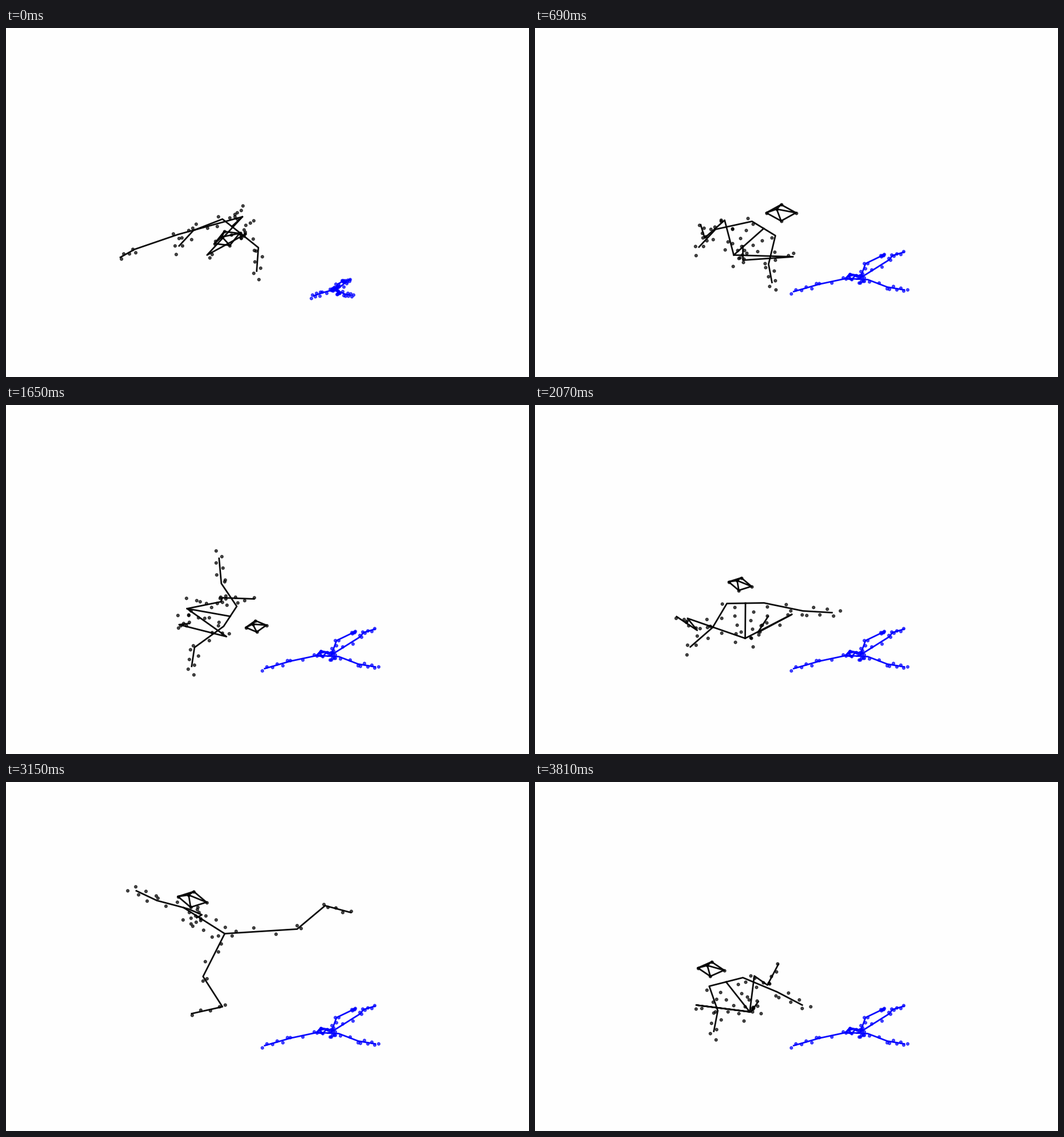
A matplotlib script that plays this animation: 917x611 px, repeating every 3.84 s.

```python
import numpy as np
import matplotlib.pyplot as plt
from matplotlib.animation import FuncAnimation

W, H, FRAMES, STEP = 917, 611, 128, 30

# Points are complex numbers, x + y*1j, in pixels.
# Joints: 0-6 hand to hand across the neck, 7 waist, 8 pelvis,
# 9-11 and 12-14 legs, 15-19 head.
CHAINS = [[0, 1, 2, 3, 4, 5, 6], [3, 7, 8],
          [11, 10, 9, 8, 12, 13, 14],
          [15, 16, 17, 18, 15, 19, 17], [16, 19, 18]]


def pose(arm_a, arm_b, pelvis, leg_a, leg_b, head, tilt):
    """Arms run hand to shoulder, legs knee to toe; the rest follows."""
    neck = (arm_a[2] + arm_b[2]) / 2
    up = -.55j * tilt
    crown = [head - tilt, head + up, head + tilt, head - up,
             head - .3 * tilt + .45 * up]
    return np.array([*arm_a, neck, *arm_b[::-1], (neck + pelvis) / 2, pelvis,
                     *leg_a, *leg_b, *crown])


crouch = pose((303+381j, 328+354j, 379+334j), (439+425j, 442+384j, 412+360j),
              414+330j, (301+361j, 225+387j, 200+401j),
              (352+397j, 420+360j, 410+366j), 387+368j, 22-9j)
kneel = pose((287+383j, 316+352j, 380+338j), (415+445j, 409+413j, 421+363j),
             348+397j, (332+336j, 297+367j, 290+344j),
             (452+400j, 364+406j, 364+381j), 431+323j, 26)
reach = pose((325+457j, 330+424j, 381+387j), (373+268j, 377+312j, 404+352j),
             317+356j, (386+405j, 303+384j, 321+382j),
             (376+344j, 379+337j, 434+339j), 438+387j, 18-2j)
sit = pose((272+423j, 311+389j, 336+347j), (520+363j, 469+360j, 401+346j),
           368+408j, (267+373j, 284+394j, 248+370j),
           (450+366j, 390+398j, 408+370j), 359+313j, 20+4j)
run = pose((297+284j, 318+268j, 323+303j), (435+384j, 404+352j, 363+335j),
           388+314j, (310+367j, 350+419j, 293+422j),
           (399+380j, 466+366j, 468+368j), 331+306j, 24+4j)
leap = pose((228+190j, 264+207j, 302+217j), (334+237j, 343+232j, 320+222j),
            383+265j, (345+340j, 379+393j, 325+405j),
            (510+257j, 559+216j, 604+228j), 326+205j, 25+5j)
rest = pose((313+436j, 320+400j, 305+357j), (468+390j, 424+367j, 364+342j),
            376+402j, (282+390j, 378+402j, 391+384j),
            (384+339j, 407+355j, 426+319j), 308+327j, 23+2j)
spread = pose((453+461j, 498+448j, 545+438j), (647+458j, 617+453j, 583+440j),
              570+437j, (621+405j, 626+398j, 646+392j),
              (579+412j, 606+399j, 612+396j), 553+435j, 9-3j)

KEYS = np.stack([crouch, kneel, reach, sit, run, leap, rest])
TIMES = np.array([0, 690, 1650, 2070, 2730, 3150, 3810.])
SLOPES = np.gradient(KEYS, TIMES, axis=0)


def smooth(u):
    return u * u * (3 - 2 * u)


def dancer(t):
    """Cubic Hermite path through the key poses, with two wide lunges."""
    k = min(np.searchsorted(TIMES, t, side="right") - 1, len(TIMES) - 2)
    span = TIMES[k + 1] - TIMES[k]
    u = (t - TIMES[k]) / span
    p = (KEYS[k] + (KEYS[k + 1] - KEYS[k]) * smooth(u)
         + span * u * (1 - u) * ((1 - u) * SLOPES[k] - u * SLOPES[k + 1]))
    lunge = sum(size * np.exp(-((t - at) / 80) ** 2)
                for at, size in ((1860, 1.2), (3390, .25)))
    p[:15] += lunge * (p[:15] - p[8]).real
    return p


def partner(t):
    """Uncurls with a small swing, then lies still."""
    s = smooth(min(t / 600, 1))
    curled = 539 + .33 * (spread.real - 453) + 1j * (468 + .41 * (spread.imag - 460))
    return curled + (spread - curled) * s + np.sin(np.pi * s) * (34 + 22j)


# Marker rows along bones: (from, to, count, px aside, px past the end)
ROWS = [(3, 8, 10, 16, 14)]
for shoulder, elbow, hand in ((2, 1, 0), (4, 5, 6)):
    ROWS += [(shoulder, elbow, 3, 6, 0), (elbow, hand, 6, 7, 14)]
for knee, ankle, toe in ((9, 10, 11), (12, 13, 14)):
    ROWS += [(8, knee, 4, 8, 0), (knee, ankle, 2, 5, 0), (ankle, toe, 4, 3, 0)]
JITTER = np.random.default_rng(4).uniform(.5, 1.2, (len(ROWS), 10))


def markers(p, scale=1):
    """Dots on alternate sides of each bone, and on the head's corners."""
    dots = [p[15:]]
    for (a, b, n, aside, past), jitter in zip(ROWS, JITTER):
        bone = p[b] - p[a]
        unit = bone / max(abs(bone), 1)
        side = aside * jitter[:n] * (-1.) ** np.arange(n)
        dots.append(p[a] + np.linspace(.1, 1, n) * (bone + scale * past * unit)
                    + 1j * scale * side * unit)
    return np.concatenate(dots)


fig = plt.figure(figsize=(W / 100, H / 100), dpi=100, facecolor="#fefefe")
ax = fig.add_axes([0, 0, 1, 1])
ax.set(xlim=(-.5, W - .5), ylim=(H - .5, -.5))
ax.axis("off")


class Figure:
    def __init__(self, color):
        self.dots, = ax.plot([], [], "o", color=color, ms=3.4, mew=1, alpha=.7)
        self.bones = [ax.plot([], [], color=color, lw=2, alpha=.95,
                              solid_joinstyle="round")[0] for _ in CHAINS]

    def move(self, joints, dots):
        self.dots.set_data(dots.real, dots.imag)
        for line, chain in zip(self.bones, CHAINS):
            line.set_data(joints[chain].real, joints[chain].imag)
        return [self.dots, *self.bones]


black, blue = Figure("black"), Figure("blue")


def draw(i):
    t = i * STEP
    lead, mate = dancer(t), partner(t)
    return (black.move(lead, markers(lead))
            + blue.move(mate, markers(mate, .4)))


anim = FuncAnimation(fig, draw, frames=FRAMES, interval=STEP,
                     repeat=True, repeat_delay=0)
plt.show()
```
